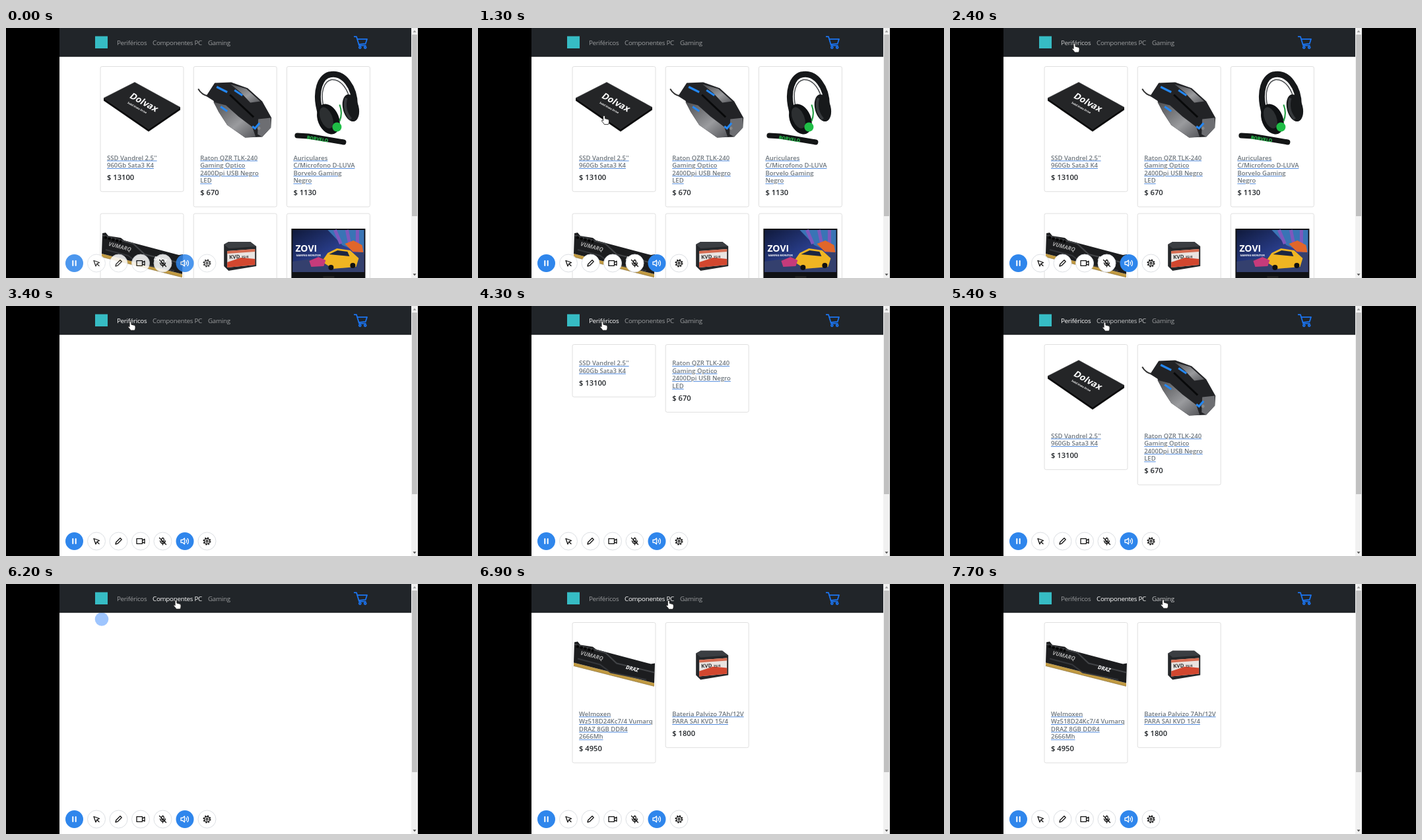
Write an HTML page that moves like this. It is 706 px wide and 380 px high and loops after 8 s.

```html
<!DOCTYPE html>
<html lang="es">
<head>
<meta charset="utf-8">
<title>Tienda</title>
<style>
  html, body { margin: 0; height: 100%; overflow: hidden; background: #000; }
  svg { display: block; width: 706px; height: 380px; }
  text { font-family: "Open Sans", "Noto Sans", sans-serif; }
  .nav text { font-size: 9.8px; letter-spacing: -.28px; fill: #fff; }
  .title { font-size: 9.5px; font-weight: 600; text-decoration: underline; fill: #4a86dc; }
  .title tspan { fill: #6c757d; }
  .price { font-size: 11.2px; font-weight: 600; fill: #212529; }
  .brand { font-weight: 700; fill: #fff; }
  .frame { fill: #fff; stroke: #dfdfdf; }
  .icon { fill: none; stroke: #111; stroke-width: 1.3; stroke-linecap: round; stroke-linejoin: round; }
  .icon.on { stroke: #fff; }
</style>
</head>
<body>
<svg viewBox="0 0 706 380">
  <defs>
    <linearGradient id="steel" x2="1" y2="1">
      <stop offset="0" stop-color="#4c4d50"/><stop offset=".6" stop-color="#9a9b9e"/><stop offset="1" stop-color="#55565a"/>
    </linearGradient>
    <linearGradient id="night" x2="1" y2="1">
      <stop offset="0" stop-color="#101a3c"/><stop offset=".55" stop-color="#2a3f8e"/><stop offset="1" stop-color="#6a3c9c"/>
    </linearGradient>
    <g id="ssd">
      <path d="M5 48V52L73 99L121 66V62Z" fill="#0c0c0d"/>
      <path d="M5 48L52 24L121 62L73 95Z" fill="#242527" stroke="#3a3b3d" stroke-width=".6"/>
      <g transform="translate(43 47) rotate(29) skewX(-12)">
        <text class="brand" font-size="13.5">Dolvax</text>
        <text class="brand" x="4" y="9" font-size="4">Solid State Drive</text>
      </g>
    </g>
    <g id="mouse">
      <path d="M7 34Q12 43 22 45" fill="none" stroke="#333" stroke-width="2"/>
      <path d="M19 45L32 25L57 24L82 33L104 53L118 78L117 93L104 107L78 108L51 89L38 69L30 52Z" fill="#222326"/>
      <path d="M30 54L49 59L68 76L89 92L94 107L78 108L51 89L38 69Z" fill="url(#steel)"/>
      <path d="M56 27L80 34L101 53L86 55L72 40Z" fill="url(#steel)"/>
      <path d="M98 80L117 78L117 93L104 107L97 103Z" fill="#6d6e72"/>
      <path d="M35 31L51 39M62 36L74 44M41 61L51 68M89 91L93 94L100 86" fill="none" stroke="#2487f2" stroke-width="3.2"/>
      <path d="M55 43L91 77" stroke="#08090a" stroke-width="3"/>
      <circle cx="99" cy="94" r="2.4" fill="#888"/>
    </g>
    <g id="headset">
      <path d="M52 74C40 37 52 13 67 12C86 9 103 31 103 59" fill="none" stroke="#16181a" stroke-width="9"/>
      <path d="M57 66C49 38 57 22 68 20C83 19 94 37 96 54" fill="none" stroke="#4a4d50" stroke-width="1.5"/>
      <ellipse cx="97" cy="63" rx="12" ry="21" fill="#17191b" transform="rotate(-14 97 63)"/>
      <path d="M90 48Q85 66 97 80" fill="none" stroke="#36393c" stroke-width="4"/>
      <ellipse cx="63" cy="80" rx="16" ry="24" fill="#101214" transform="rotate(-22 63 80)"/>
      <ellipse cx="60" cy="78" rx="9" ry="17" fill="#2c2f31" transform="rotate(-22 60 78)"/>
      <path d="M80 58Q85 71 80 83" fill="none" stroke="#169a38" stroke-width="2"/>
      <circle cx="76" cy="92" r="7" fill="#1fbd46"/>
      <path d="M16 105L33 106L86 115" fill="none" stroke="#131516" stroke-width="8" stroke-linecap="round"/>
      <text class="brand" transform="translate(30 110) rotate(9)" font-size="7" style="fill:#28d653">BORVELO</text>
    </g>
    <g id="memory">
      <path d="M2 61L124 92V97L2 66Z" fill="#c19a42"/>
      <path d="M2 66L124 97" stroke="#6c5523" stroke-dasharray="1 1"/>
      <path d="M3 30L8 29L12 34L31 37L36 41L119 63L125 62L124 92L2 61Z" fill="#1c1d1f"/>
      <path d="M3 33L50 46L67 62L124 76" fill="none" stroke="#424447" stroke-width="2"/>
      <path d="M8 55L42 64L58 76L112 87" fill="none" stroke="#34363a" stroke-width="2"/>
      <path d="M6 36L32 43" stroke="#050505" stroke-width="4" stroke-dasharray="4 2"/>
      <g transform="rotate(15)" font-style="italic">
        <text class="brand" x="24" y="44" font-size="8.5" style="fill:#aaa">VUMARQ</text>
        <text class="brand" x="96" y="47" font-size="8">DRAZ</text>
      </g>
    </g>
    <g id="battery">
      <path d="M46 47L53 43H86L95 50V80L53 87L46 80Z" fill="#25272a"/>
      <path d="M46 47L53 43H86L95 50L53 53Z" fill="#3b3e42"/>
      <path d="M51 57L93 54V78L51 82Z" fill="#e9e4e1"/>
      <path d="M51 74L72 67L93 69V78L51 82Z" fill="#d2472f"/>
      <path d="M51 57L93 54V58L51 61Z" fill="#d66b50"/>
      <text class="brand" transform="translate(54 69) rotate(-3)" font-size="8" style="fill:#333">KVD <tspan font-size="5">15/4</tspan></text>
    </g>
    <g id="monitor">
      <path d="M7 23H119V98H7Z" fill="#101114"/>
      <path d="M9 25H117V89H9Z" fill="url(#night)"/>
      <path d="M62 25H117V62L84 48Z" fill="#3974b5"/>
      <path d="M73 25L82 46M91 25L96 49M107 25V52" stroke="#7d58bd" stroke-width="5"/>
      <path d="M9 73L117 58V89H9Z" fill="#34406e"/>
      <path d="M53 73L62 60L76 53L96 56L109 68L105 81L70 84Z" fill="#f0b522"/>
      <path d="M64 62L77 56L92 58L95 65Z" fill="#1c2743"/>
      <path d="M88 46L101 41L114 48L116 59L100 58Z" fill="#e1662a"/>
      <path d="M34 72L48 66L59 71L56 80L37 81Z" fill="#c63b7b"/>
      <circle cx="67" cy="82" r="4" fill="#111"/><circle cx="100" cy="79" r="4" fill="#111"/>
      <text class="brand" x="13" y="58" font-size="14">ZOVI</text>
      <text class="brand" x="14" y="65" font-size="4">GAMING MONITOR</text>
      <path d="M55 95H72V99H55Z" fill="#222"/>
    </g>
  </defs>

  <path d="M81 0H614V380H81Z" fill="#fff"/>
  <g id="shop"></g>
  <circle id="spinner" cx="145" cy="53.5" fill="#0d6efd"/>

  <path d="M81 0H614V43.5H81Z" fill="#212529"/>
  <path d="M81 43H614" stroke="#15181a"/>
  <path d="M135 12.5H154V31H135Z" fill="#36bcc4"/>
  <g class="nav">
    <text x="168" y="25.5">Periféricos</text>
    <text x="222" y="25.5">Componentes PC</text>
    <text x="306" y="25.5">Gaming</text>
  </g>
  <g fill="none" stroke="#1b74f0" stroke-width="1.8" stroke-linejoin="round">
    <path d="M527 13.2H531L535 26.6H545.5M532 16.8H547L544.8 23.8L534.3 24.8"/>
    <circle cx="536.3" cy="29.6" r="1.5"/><circle cx="544.2" cy="29.6" r="1.5"/>
  </g>

  <path d="M614 0H624V380H614Z" fill="#f1f1f1"/>
  <path d="M615 10H623V286H615Z" fill="#c1c1c1"/>
  <path d="M616.5 6.5L619 3.5L621.5 6.5Z" fill="#999"/>
  <path d="M616.5 373.5L619 376.5L621.5 373.5Z" fill="#505050"/>

  <g id="tools"></g>
  <path id="cursor" fill="#fff" stroke="#222" stroke-width=".9" stroke-linejoin="round"/>
</svg>
<script>
const $ = id => document.getElementById(id);
const PITCH = 11.6, IMAGE_GAP = 110.5;

const products = {
  ssd: { lines: ["SSD Vandrel 2.5''", "960Gb Sata3 K4"], price: 13100 },
  mouse: { lines: ["Raton QZR TLK-240", "Gaming Optico", "2400Dpi USB Negro", "LED"], price: 670 },
  headset: { lines: ["Auriculares", "C/Microfono D-LUVA", "Borvelo Gaming", "Negro"], price: 1130 },
  memory: { lines: ["Welmoxen", "Wz518D24Kc7/4 Vumarq", "DRAZ 8GB DDR4", "2666Mh"], price: 4950 },
  battery: { lines: ["Bateria Palvizo 7Ah/12V", "PARA SAI KVD 15/4"], price: 1800 },
  monitor: { lines: ["Monitor"], price: 9900 }
};

function card(name, index, loaded) {
  const { lines, price } = products[name];
  const x = 143 + (index % 3) * 141.2, y = index < 3 ? 58.5 : 282;
  const lift = loaded ? 0 : IMAGE_GAP, end = 142 - lift + lines.length * PITCH;
  const titles = lines.map((line, i) =>
    `<text class="title" x="10" y="${142 - lift + i * PITCH}"><tspan>${line}</tspan></text>`).join("");
  return `<g transform="translate(${x} ${y})">
    <rect class="frame" width="126" height="${end + 25}" rx="2.5"/>
    ${loaded ? `<use href="#${name}"/>` : ""}${titles}
    <text class="price" x="10" y="${end + 7.3}">$ ${price}</text></g>`;
}

const cards = (names, loaded = true) => names.map((name, i) => card(name, i, loaded)).join("");
const peripherals = ["ssd", "mouse"], components = ["memory", "battery"];
const scenes = [
  [0, cards(Object.keys(products))],
  [3400, ""],
  [4300, cards(peripherals, false)],
  [4500, cards(peripherals)],
  [5600, ""],
  [6500, cards(components, false)],
  [6700, cards(components)]
];

const icons = [
  "M-2.2 -3.5V3.5M2.2 -3.5V3.5",
  "M-4 -4L4.5 -1L.8 .8L-1 4.5ZM1 1L4 4",
  "M-4.5 4.5L-3.7 1.5L2.5 -4.7L4.7 -2.5L-1.5 3.7Z",
  "M-6 -3.8H2.5V3.8H-6ZM2.5 -1L6 -3.2V3.2L2.5 1",
  "M-1.8 -3Q0 -7 1.8 -3V0Q0 3 -1.8 0ZM-4 -.5Q-3 3.5 0 3.5Q3 3.5 4 -.5M0 3.5V5.5M-5 -5L5 5",
  "M-6 -2H-3.5L-.5 -4.5V4.5L-3.5 2H-6ZM2 -2Q3.5 0 2 2M4 -4Q7 0 4 4",
  "M-4 0A4 4 0 1 1 4 0A4 4 0 1 1 -4 0M-1.5 0A1.5 1.5 0 1 1 1.5 0A1.5 1.5 0 1 1 -1.5 0"
];
$("tools").innerHTML = icons.map((d, i) => {
  const on = i === 0 || i === 5;
  const teeth = i === 6 ? '<circle r="5.2" stroke-width="1.6" stroke-linecap="butt" stroke-dasharray="2.04 2.04"/>' : "";
  return `<g transform="translate(${103.5 + i * 33.5} 357.5)">
    <circle r="13.5" fill="${on ? "#2f86ec" : "#fff"}" stroke="${on ? "none" : "#dcdfe3"}"/>
    <g class="icon ${on ? "on" : ""}"><path d="${d}" ${i ? "" : 'stroke-width="2"'}/>${teeth}</g></g>`;
}).join("");

const HAND = "M-1.4 1Q0 -.8 1.4 1V4.6L6 5.8Q7.6 6.2 7.5 8V10Q7.4 12 6.3 13.6H.4Q-1 11 -3.4 8.8Q-3.8 7 -2.4 7.2L-1.4 8.2Z";
const ARROW = "M0 0V11L2.6 8.6L4.4 12.4L6 11.7L4.3 8H7.8Z";

// Pointer tip: time, x, y
const route = [
  [100, 606, 366], [800, 290, 328], [900, 290, 328], [1300, 191, 133], [1700, 191, 133],
  [2200, 186.5, 24], [2300, 186.5, 24], [2400, 188.5, 23.5], [4700, 188.5, 23.5],
  [5100, 357, 122], [5200, 357, 122], [5400, 234.5, 24.5], [5500, 234.5, 24.5],
  [5600, 257.5, 24.5], [6800, 257.5, 24.5], [7000, 320, 25], [7600, 320, 25], [7700, 323, 23.5]
];
function pointer(t) {
  const next = route.findIndex(stop => stop[0] > t);
  if (next < 1) return route[next < 0 ? route.length - 1 : 0].slice(1);
  const [t0, x0, y0] = route[next - 1], [t1, x1, y1] = route[next];
  const k = (t - t0) / (t1 - t0), e = k * k * (3 - 2 * k);
  return [x0 + (x1 - x0) * e, y0 + (y1 - y0) * e];
}

const links = [...document.querySelectorAll(".nav text")];
const spans = [[168, 213], [222, 297], [306, 340]];
let shown;

function draw(now) {
  const t = Math.floor(now % 8000 / 100) * 100;
  const [start, markup] = scenes.findLast(scene => scene[0] <= t);
  if (shown !== start) {
    $("shop").innerHTML = markup;
    shown = start;
  }

  const phase = (t - start) % 750 / 750;
  $("spinner").setAttribute("r", markup ? 0 : 10.3 * Math.min(1, phase * 2));
  $("spinner").setAttribute("opacity", phase < .5 ? phase * 2 : 2 - phase * 2);

  const [x, y] = pointer(t);
  $("cursor").setAttribute("d", t < 100 ? "" : t < 1000 ? ARROW : HAND);
  $("cursor").setAttribute("transform", `translate(${x} ${y})`);

  const active = t < 3400 ? -1 : t < 5600 ? 0 : 1;
  links.forEach((link, i) => {
    const over = t >= 1000 && y < 35 && x >= spans[i][0] && x <= spans[i][1];
    link.setAttribute("fill-opacity", i === active ? 1 : over ? .75 : .55);
  });

  $("tools").setAttribute("opacity", Math.min(1, .86 + t / 5000));
  requestAnimationFrame(draw);
}
requestAnimationFrame(draw);
</script>
</body>
</html>
```
